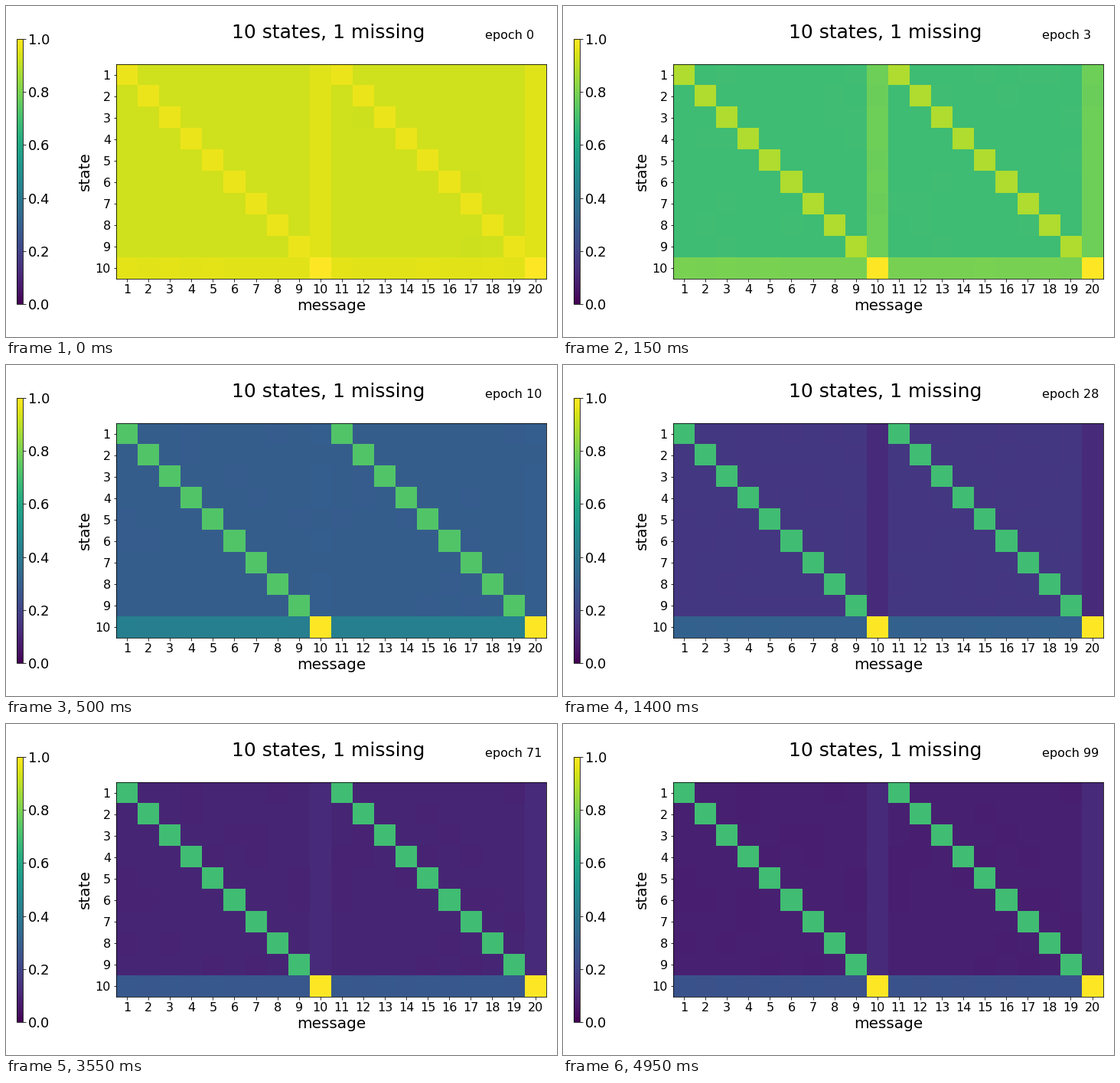
Recreate the animation shown at these times as a matplotlib script. Size 720x432 px, loop 5 s.

```python
import numpy as np
import matplotlib.pyplot as plt
from matplotlib.animation import FuncAnimation

STATES, MESSAGES, EPOCHS = 10, 20, 100

rng = np.random.default_rng(4)
speckle = rng.uniform(-1, 1, (STATES, MESSAGES))


def fall(epoch, middle, width=3.2):
    """Logistic drop from one to zero around the middle epoch."""
    return 1 / (1 + np.exp((epoch - middle) / width))


def matrix(epoch):
    rest = 0.07 + 0.175 * np.exp(-epoch / 42) + fall(epoch, 2.45)
    grid = np.full((STATES, MESSAGES), rest)
    grid[:, STATES - 1::STATES] = 0.12 + fall(epoch, 5.1)
    grid[-1] = 0.33 - 0.0008 * epoch + 0.8 * fall(epoch, 4.1)
    grid += 0.002 * speckle
    for i in range(STATES):
        grid[i, i::STATES] = 0.692 + 0.41 * fall(epoch, 2.45)
    grid[-1, STATES - 1::STATES] = 1
    return grid


fig = plt.figure(figsize=(10, 6), dpi=72, facecolor="white")
ax = fig.add_axes([0.2, 0.1, 0.78, 0.8])
image = ax.imshow(matrix(0), cmap="viridis", vmin=0, vmax=1)
ax.set_xticks(range(MESSAGES), range(1, MESSAGES + 1), fontsize=16)
ax.set_yticks(range(STATES), range(1, STATES + 1), fontsize=16)
ax.set_xlabel("message", fontsize=20)
ax.set_ylabel("state", fontsize=20)

bar = fig.colorbar(image, cax=fig.add_axes([0.02, 0.1, 0.01, 0.8]))
bar.ax.tick_params(labelsize=18)

fig.text(0.41, 0.9025, "10 states, 1 missing", fontsize=25)
label = fig.text(0.87, 0.9, "epoch 0", fontsize=16)


def update(epoch):
    image.set_data(matrix(epoch))
    label.set_text(f"epoch {epoch}")
    return image, label


anim = FuncAnimation(fig, update, frames=EPOCHS, interval=50,
                     repeat=True, repeat_delay=0)
plt.show()
```
